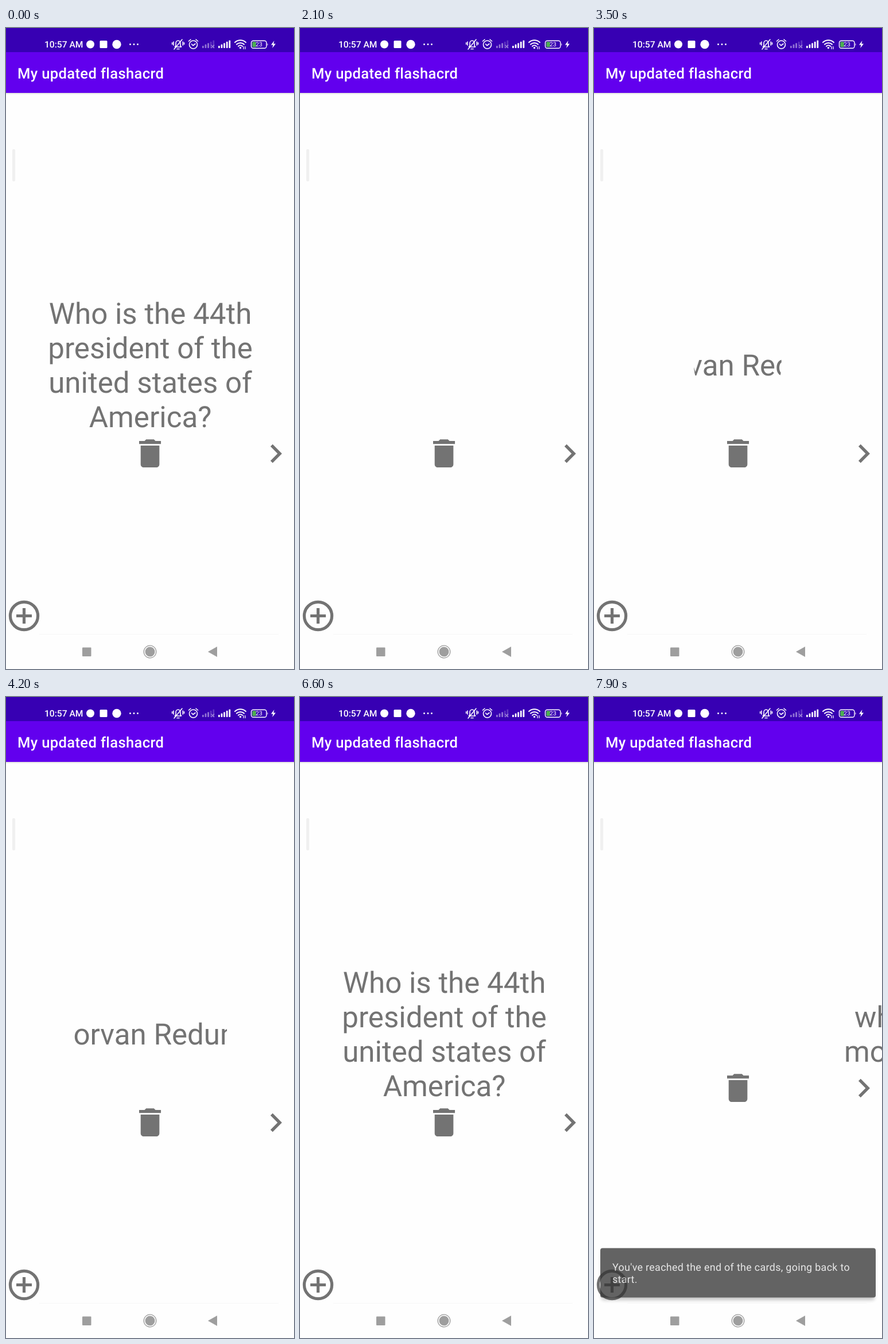
Recreate the animation shown at these times as an HTML page. Size 502x1116 px, loop 8000 ms.

```html
<!DOCTYPE html>
<html lang="en">
<head>
<meta charset="utf-8">
<title>Flashcard</title>
<style>
  html, body { margin: 0; width: 100%; height: 100%; overflow: hidden; background: #fefefe; }
  svg { display: block; width: 100vw; height: 100vh; }
  text { font-family: Roboto, sans-serif; text-rendering: geometricPrecision; white-space: pre; }
  .card { font-size: 51.1px; fill: #737373; }
  .mid { text-anchor: middle; }
  .line { fill: none; stroke: #fff; stroke-width: 1.6; stroke-linecap: round; stroke-linejoin: round; }
</style>
</head>
<body>
<svg viewBox="0 0 502 1116">
  <defs>
    <clipPath id="lens"><circle id="hole" cx="250.5" cy="586" r="0"/></clipPath>
    <linearGradient id="shade" x2="0" y2="1">
      <stop stop-color="#000" stop-opacity=".14"/>
      <stop offset="1" stop-color="#000" stop-opacity="0"/>
    </linearGradient>
    <filter id="soft" x="-10%" y="-30%" width="120%" height="160%"><feGaussianBlur stdDeviation="3"/></filter>
  </defs>

  <rect width="502" height="1116" fill="#fefefe"/>
  <rect y="113" width="502" height="3" fill="url(#shade)"/>
  <rect y="41" width="502" height="72" fill="#6200ee"/>
  <rect width="502" height="42" fill="#3700b3"/>
  <text x="20" y="87.5" font-size="25.6" font-weight="500" letter-spacing=".33" fill="#fff">My updated flashacrd</text>

  <!-- status bar -->
  <g fill="#fff">
    <text x="67" y="34" font-size="15.6" font-weight="500">10:57 AM</text>
    <circle cx="147" cy="28.5" r="7"/>
    <rect x="163.5" y="22" width="13" height="13" rx="1.5"/>
    <circle cx="193" cy="28.5" r="7.7"/>
    <circle cx="216.5" cy="28.5" r="1.4"/>
    <circle cx="223" cy="28.5" r="1.4"/>
    <circle cx="229.5" cy="28.5" r="1.4"/>
    <g class="line">
      <path d="M294.5 33h11l-1.5-2.5v-4a4 4.5 0 0 0-8 0v4zM298 36.5h4M307 20l-14 17M292 24v6M289.7 25.5v3M308.3 24v6M310.5 25.5v3"/>
      <circle cx="326.5" cy="29" r="7"/>
      <path d="M323.5 28l2.5 2.5 4-3M318.5 23l3.5-3M334.5 23l-3.5-3"/>
      <path d="M399 25a14 14 0 0 1 19 0M402 28.5a9.5 9.5 0 0 1 13 0M405 31.7a5 5 0 0 1 7 0" stroke-width="2"/>
    </g>
    <circle cx="408.5" cy="34.5" r="1.7"/>
    <path d="M414 32v5M417 32v5" stroke="#fff" stroke-width="1.2"/>
    <g id="bars"></g>
    <path d="M357.500 29.500l5.500 5.500M363 29.500l-5.500 5.500" stroke="#fff" stroke-opacity=".45" stroke-width="1.4"/>
    <rect x="429.3" y="24" width="6.5" height="9.3" rx="1.5" fill="#4caf50"/>
    <rect class="line" x="427.5" y="22.2" width="26.5" height="13" rx="3.5" style="stroke-width:1.4"/>
    <path d="M455.5 26.5q2 2 0 4.5z"/>
    <text class="mid" x="441" y="32.4" font-size="10.5">23</text>
    <path d="M467.5 22l-5.5 7.5h3.5l-1.3 5.5 5.8-7.5h-3.7z"/>
  </g>

  <rect x="11" y="211" width="5" height="56" rx="2" fill="#f0f0f0"/>

  <g id="question" class="card mid"></g>
  <g id="answer" clip-path="url(#lens)">
    <text class="card mid" x="251" y="605">Corvan Redum</text>
  </g>
  <g id="next" class="card">
    <text x="114" y="575">what is the</text>
    <text x="96" y="635">moon made of?</text>
  </g>

  <g id="tools" fill="#737373">
    <path transform="translate(218.4 708) scale(2.72)" d="M6 19c0 1.1.9 2 2 2h8c1.1 0 2-.9 2-2V7H6zM19 4h-3.5l-1-1h-5l-1 1H5v2h14z"/>
    <path transform="translate(437.8 708.6) scale(2.7)" d="M10 6L8.59 7.41 13.17 12l-4.58 4.59L10 18l6-6z"/>
  </g>
  <g fill="none" stroke="#737373" stroke-width="5.2">
    <circle cx="31.5" cy="1023.5" r="24.1"/>
    <path d="M31.5 1010v27M18 1023.5h27"/>
  </g>

  <g id="snack">
    <rect x="13" y="966" width="476" height="84" rx="4" opacity=".3" filter="url(#soft)"/>
    <rect x="11" y="959.5" width="480" height="86" rx="4" fill="#323232"/>
    <g font-size="17.9" letter-spacing=".32" fill="#e0e0e0">
      <text x="32" y="999">You've reached the end of the cards, going back to</text>
      <text x="32" y="1020">start.</text>
    </g>
  </g>

  <!-- navigation bar -->
  <path d="M58 1055.5h417" stroke="#f7f7f7"/>
  <g fill="#9e9e9e">
    <rect x="133" y="1078.5" width="15.5" height="15.5" rx="1"/>
    <circle cx="251" cy="1086" r="8.5"/>
    <circle cx="251" cy="1086" r="10.8" fill="none" stroke="#9e9e9e" stroke-width="1.3"/>
    <path d="M352 1086l16-9v18z"/>
  </g>
</svg>
<script>
  const LOOP = 8000, STEP = 100, WIDTH = 502;
  const HIDE = 2000, REVEAL = 2090, BACK = 6000, LEAVE = 7700, ENTER = 7850, SNACK = 7800;
  const SLIDE = 130;
  const $ = id => document.getElementById(id);
  const clamp = v => Math.min(1, Math.max(0, v));
  const ease = p => (1 - Math.cos(Math.PI * clamp(p))) / 2;
  const show = (id, on) => $(id).setAttribute('display', on ? 'inline' : 'none');
  const shift = (id, x, y) => $(id).setAttribute('transform', `translate(${x} ${y})`);

  $('question').innerHTML =
    ['Who is the 44th', 'president of the', 'united states of', 'America?']
      .map((s, i) => `<text x="251.5" y="${515 + 60 * i}">${s}</text>`).join('');

  const signal = (x, alpha) => [0, 1, 2, 3, 4].map(i => {
    const h = 4 + 2.4 * i;
    return `<rect x="${x + 4.6 * i}" y="${35 - h}" width="2.8" height="${h}" rx="1" opacity="${alpha(i)}"/>`;
  }).join('');
  $('bars').innerHTML = signal(342, i => i < 3 ? 0.45 : 0.2) + signal(370, () => 1);

  function draw(time) {
    const t = Math.floor(time / STEP) * STEP;
    const entered = t >= ENTER;

    show('question', t < HIDE || (t >= BACK && !entered));
    shift('question', -WIDTH * ease((t - LEAVE) / SLIDE), 0);

    show('answer', t >= REVEAL && t < BACK);
    $('hole').setAttribute('r', 169 * ease((t - REVEAL) / 3000));

    show('next', entered);
    shift('next', WIDTH * (1 - ease((t - ENTER) / SLIDE)), 0);
    shift('tools', 0, entered ? -60 : 0);

    $('snack').setAttribute('opacity', clamp((t - SNACK) / 132));
  }

  const start = performance.now();
  function tick() {
    draw((performance.now() - start) % LOOP);
    requestAnimationFrame(tick);
  }
  tick();
</script>
</body>
</html>
```
